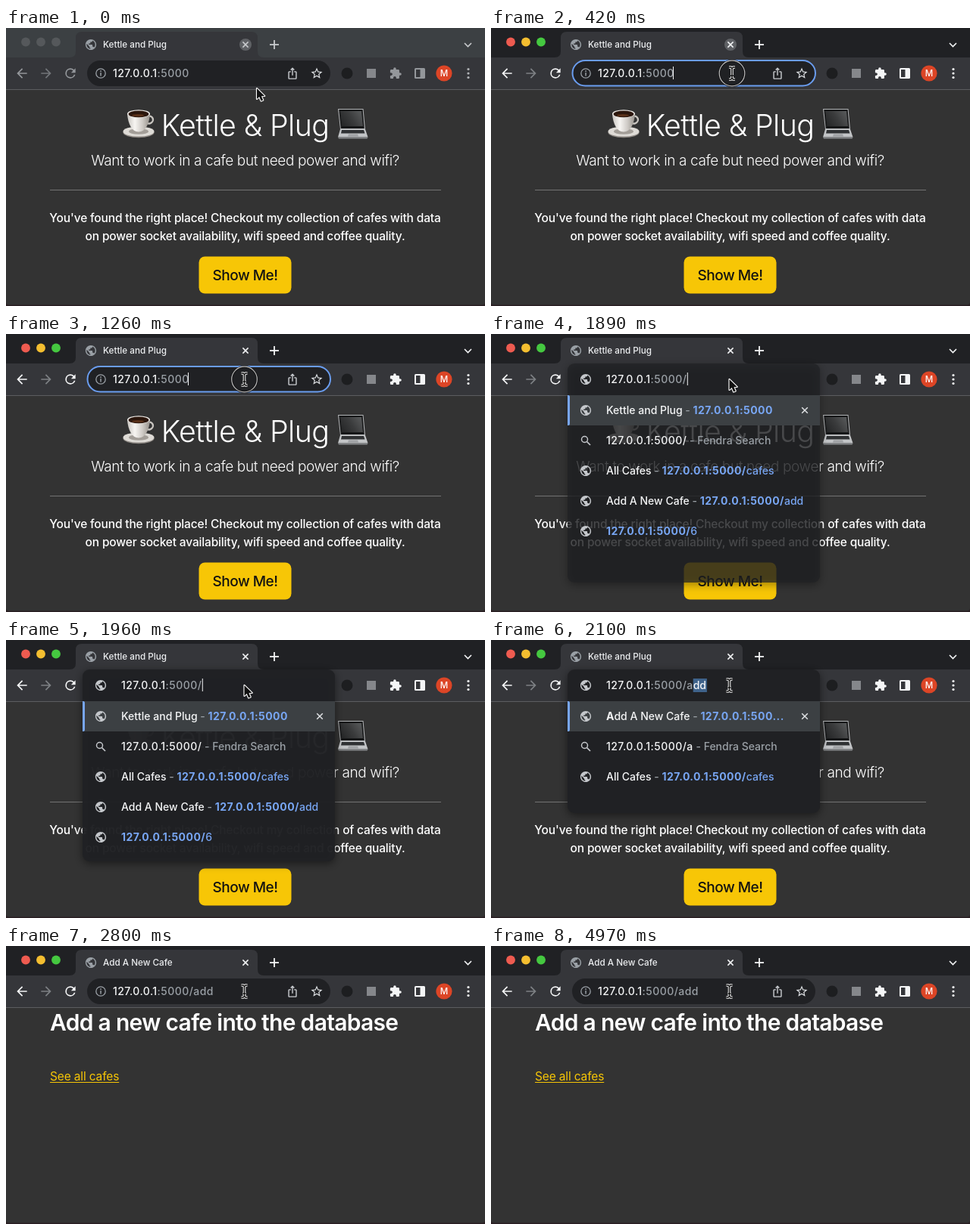
Animation of 632x368 px, one loop 5390 ms. Source, as an HTML page with a canvas:

```html
<!DOCTYPE html>
<html lang="en">
<head>
<meta charset="utf-8">
<title>Kettle and Plug</title>
<style>
  html, body { margin: 0; width: 100%; height: 100%; overflow: hidden; background: #333; }
  canvas { display: block; width: 632px; height: 368px; }
</style>
</head>
<body>
<canvas id="stage" width="632" height="368"></canvas>
<script>
const g = document.getElementById('stage').getContext('2d');
const LOOP = 5390, TICK = 70;
const WHITE = '#f4f5f6', GREY = '#9aa0a6', BLUE = '#78a6f3', YELLOW = '#f7c606';
const SELECT = '#3f638b', DARK = '#202124', BAR = '#35363a', PAGE = '#333333';
const HOST = '127.0.0.1', ADDR = HOST + ':5000';

const icons = {
  globe: 'M12 2C6.48 2 2 6.48 2 12s4.48 10 10 10 10-4.48 10-10S17.52 2 12 2zm-1 17.93c-3.95-.49-7-3.85-7-7.93 0-.62.08-1.21.21-1.79L9 15v1c0 1.1.9 2 2 2v1.93zm6.9-2.54c-.26-.81-1-1.39-1.9-1.39h-1v-3c0-.55-.45-1-1-1H8v-2h2c.55 0 1-.45 1-1V7h2c1.1 0 2-.9 2-2v-.41c2.93 1.19 5 4.06 5 7.41 0 2.08-.8 3.97-2.1 5.39z',
  reload: 'M17.65 6.35A7.96 7.96 0 0 0 12 4a8 8 0 1 0 7.73 10h-2.08A6 6 0 1 1 12 6c1.66 0 3.14.69 4.22 1.78L13 11h7V4l-2.35 2.35z',
  back: 'M20 11H7.83l5.59-5.59L12 4l-8 8 8 8 1.41-1.41L7.83 13H20v-2z',
  star: 'M22 9.24l-7.19-.62L12 2 9.19 8.63 2 9.24l5.46 4.73L5.82 21 12 17.27 18.18 21l-1.63-7.03L22 9.24zM12 15.4l-3.76 2.27 1-4.28-3.32-2.88 4.38-.38L12 6.1l1.71 4.04 4.38.38-3.32 2.88 1 4.28L12 15.4z',
  share: 'M16 5l-1.42 1.42-1.59-1.59V16h-1.98V4.83L9.42 6.42 8 5l4-4 4 4zm4 5v11c0 1.1-.9 2-2 2H6c-1.11 0-2-.9-2-2V10c0-1.11.89-2 2-2h3v2H6v11h12V10h-3V8h3c1.1 0 2 .89 2 2z',
  puzzle: 'M20.5 11H19V7c0-1.1-.9-2-2-2h-4V3.5a2.5 2.5 0 0 0-5 0V5H4c-1.1 0-2 .9-2 2v3.8h1.5c1.49 0 2.7 1.21 2.7 2.7s-1.21 2.7-2.7 2.7H2V20c0 1.1.9 2 2 2h3.8v-1.5c0-1.49 1.21-2.7 2.7-2.7s2.7 1.21 2.7 2.7V22H17c1.1 0 2-.9 2-2v-4h1.5a2.5 2.5 0 0 0 0-5z'
};
for (const k in icons) icons[k] = new Path2D(icons[k]);

function icon(name, x, y, size, color, flip) {
  const s = size / 24;
  g.save();
  g.translate(x, y);
  g.scale(flip ? -s : s, s);
  g.translate(-12, -12);
  g.fillStyle = color;
  g.fill(icons[name]);
  g.restore();
}

function box(x, y, w, h, r, fill) {
  g.beginPath();
  g.roundRect(x, y, w, h, r);
  g.fillStyle = fill;
  g.fill();
}

function oval(x, y, rx, ry, fill) {
  g.beginPath();
  g.ellipse(x, y, rx, ry, 0, 0, Math.PI * 2);
  g.fillStyle = fill;
  g.fill();
}

const dot = (x, y, r, fill) => oval(x, y, r, r, fill);

function ring(x, y, r, width, color) {
  g.beginPath();
  g.arc(x, y, r, 0, Math.PI * 2);
  stroke(width, color);
}

function stroke(width, color) {
  g.lineWidth = width;
  g.strokeStyle = color;
  g.stroke();
}

function poly(pts) {
  g.beginPath();
  for (let i = 0; i < pts.length; i += 2) g.lineTo(pts[i], pts[i + 1]);
}

function line(width, color, ...pts) {
  poly(pts);
  stroke(width, color);
}

function fillPoly(fill, ...pts) {
  poly(pts);
  g.fillStyle = fill;
  g.fill();
}

function fade(x0, y0, x1, y1, ...colors) {
  const f = g.createLinearGradient(x0, y0, x1, y1);
  colors.forEach((c, i) => f.addColorStop(i / (colors.length - 1), c));
  return f;
}

function cross(x, y, r, color) {
  line(1.5, color, x - r, y - r, x + r, y + r);
  line(1.5, color, x + r, y - r, x - r, y + r);
}

// Returns the advance width of the drawn text.
function text(s, x, y, size, color, { weight = 400, align = 'left', track = 0 } = {}) {
  g.font = `${weight} ${size}px Inter, "Open Sans", sans-serif`;
  g.letterSpacing = track + 'px';
  g.textAlign = align;
  g.fillStyle = color;
  g.fillText(s, x, y);
  return g.measureText(s).width;
}

// Addresses are set a little wider than words.
function runs(x, y, parts) {
  for (const [s, color, weight = 450] of parts) {
    x += text(s, x, y, 14, color, { weight, track: /\d/.test(s) ? 0.45 : 0 });
  }
  return x;
}

function frame(active, title, hover) {
  box(0, 0, 632, 82, 0, active ? DARK : '#3c4043');
  const lights = active ? ['#ee5b50', '#f4be30', '#45c840'] : Array(3).fill('#55585b');
  lights.forEach((c, i) => dot(26 + i * 20, 18.5, 5.9, c));

  g.beginPath();
  g.moveTo(84, 39);
  g.quadraticCurveTo(92, 39, 92, 31);
  g.lineTo(92, 13);
  g.quadraticCurveTo(92, 5, 100, 5);
  g.lineTo(324, 5);
  g.quadraticCurveTo(332, 5, 332, 13);
  g.lineTo(332, 31);
  g.quadraticCurveTo(332, 39, 340, 39);
  g.fillStyle = BAR;
  g.fill();
  box(0, 39, 632, 42, 0, BAR);
  box(0, 81, 632, 1, 0, '#5c5d60');

  const bright = active ? WHITE : '#c8cacd';
  icon('globe', 112, 22, 17, GREY);
  text(title, 128, 26, 11.7, '#eceef0', { weight: 500 });
  if (hover) dot(316, 22, 8, '#5f6165');
  cross(316, 22, 3.6, bright);
  line(1.8, bright, 348, 22, 360, 22);
  line(1.8, bright, 354, 16, 354, 28);
  line(1.6, bright, 605, 20, 609.5, 24.5, 614, 20);

  const tool = active ? WHITE : '#94979b';
  icon('back', 21, 60, 20, tool);
  icon('back', 53, 60, 20, active ? '#7d8084' : '#73767a', true);
  icon('reload', 85, 60, 20, tool);
  dot(450, 60, 7.5, '#1d1e20');
  box(476, 54, 12, 12, 0, '#85878b');
  icon('puzzle', 514, 60, 17, tool);
  box(539, 53, 14, 14, 1.5, tool);
  box(541, 55, 5.5, 10, 0, BAR);
  dot(578, 60, 10.6, '#dc4526');
  text('M', 578, 64, 11.5, '#fff', { weight: 500, align: 'center' });
  for (const y of [54.5, 60, 65.5]) dot(610, y, 1.6, active ? WHITE : '#b0b3b6');
}

function omnibox(path, focus, selected, caret) {
  box(107, 43, 321, 34, 17, DARK);
  if (focus) {
    g.beginPath();
    g.roundRect(107.5, 43, 320.5, 33.5, 16.75);
    stroke(2, '#6a9df0');
  }
  ring(125, 60, 6.2, 1.3, GREY);
  box(124.3, 59, 1.5, 4.5, 0, GREY);
  box(124.3, 56.3, 1.5, 1.6, 0, GREY);
  if (selected) box(141, 51, 100, 18, 0, SELECT);
  runs(141, 65, [[HOST, WHITE], [':5000' + path, selected ? WHITE : GREY]]);
  if (caret) box(240, 51, 1, 17, 0, WHITE);
  icon('share', 378, 60, 17, '#c9ccd0');
  icon('star', 410, 60, 18, '#dcdfe2');
}

function cup() {
  oval(175, 138.2, 20.5, 7, '#8f8a85');
  oval(175, 137, 20.5, 6.6, '#dedbd6');
  oval(175, 137, 13, 3.8, '#a39e98');
  g.beginPath();
  g.ellipse(188.5, 121.5, 5.5, 5, -0.3, 0, Math.PI * 2);
  stroke(2.4, '#c9c5c0');
  g.beginPath();
  g.moveTo(160, 113.5);
  g.bezierCurveTo(161, 127, 166, 137.5, 175, 137.5);
  g.bezierCurveTo(184, 137.5, 189, 127, 190, 113.5);
  g.fillStyle = fade(160, 0, 190, 0, '#c9c6c1', '#f7f5f2', '#cfcbc6', '#96918b');
  g.fill();
  oval(175, 113.5, 15, 5.3, '#ece9e5');
  oval(175, 113.9, 13.4, 4.3, '#2b160c');
  oval(174, 115.6, 8, 1.7, '#5a3119');
}

function laptop() {
  fillPoly('#b4b6b8', 438, 107, 471.5, 107, 474, 134, 441, 134);
  fillPoly('#151617', 439.2, 108, 470.6, 108, 472.8, 133, 441.8, 133);
  fillPoly(fade(441, 130, 471, 110, '#222324', '#3a3b3c', '#5c5e5f'),
    441, 110, 469, 110, 471, 130, 443, 130);
  fillPoly('#c2c4c6', 441, 134, 474, 134, 477.5, 144.5, 438, 144.5);
  fillPoly('#85888a', 438, 144.5, 477.5, 144.5, 476.5, 146.5, 439, 146.5);
  fillPoly('#303234', 443, 135, 472, 135, 473.5, 139.5, 442, 139.5);
  fillPoly('#9fa1a4', 452, 140.5, 464, 140.5, 465, 143.5, 451, 143.5);
}

function home() {
  const mid = { align: 'center' };
  cup();
  laptop();
  text('Kettle & Plug', 315.5, 143, 39.3, '#fff', { ...mid, weight: 350, track: -0.6 });
  text('Want to work in a cafe but need power and wifi?', 315.5, 182, 19, '#fff',
    { ...mid, weight: 350, track: -0.38 });
  box(58, 214, 516, 1, 0, '#737373');
  const body = { ...mid, weight: 450, track: -0.16 };
  text("You've found the right place! Checkout my collection of cafes with data", 315.5, 257, 15.5, '#fff', body);
  text('on power socket availability, wifi speed and coffee quality.', 315.5, 281, 15.5, '#fff', body);
  box(254.5, 302.5, 122, 49, 8, YELLOW);
  text('Show Me!', 315.5, 334, 19, '#111', { ...mid, weight: 450, track: -0.5 });
}

function addPage() {
  text('Add a new cafe into the database', 58, 112, 30, '#fff', { weight: 600, track: -0.7 });
  const w = text('See all cafes', 58, 178, 15.5, YELLOW, { track: -0.15 });
  box(58, 180, w, 1.1, 0, YELLOW);
}

const dash = [' - ', GREY];
const bold = s => [s, BLUE, 700];
const search = path => ({ find: true, parts: [[ADDR + path, WHITE], [' - Fendra Search', GREY]] });
const link = (title, tail) => ({ parts: [[title, WHITE], dash, bold(ADDR + '/'), [tail, BLUE]] });
const addRow = n => ({
  parts: [['Add'.slice(0, n), WHITE, 700], ['Add'.slice(n) + ' A New Cafe', WHITE], dash, bold(HOST + ':500...')]
});

function rowsFor(path) {
  if (path === '/') return [
    { parts: [['Kettle and Plug', WHITE], dash, bold(ADDR)] },
    search('/'),
    link('All Cafes', 'cafes'),
    link('Add A New Cafe', 'add'),
    { parts: [bold(ADDR + '/'), ['6', BLUE]] }
  ];
  const rows = [addRow(path.length - 1), search(path)];
  if (path === '/a') rows.push(link('All Cafes', 'cafes'));
  return rows;
}

function popup(path, bottom, alpha) {
  g.save();
  g.globalAlpha = alpha;
  g.shadowColor = 'rgba(0,0,0,.5)';
  g.shadowBlur = 12;
  g.shadowOffsetY = 3;
  box(101, 39, 333, bottom - 39, 9, DARK);
  g.restore();

  icon('globe', 125, 60, 17, '#c4c7cb');
  const x = runs(152, 65, [[HOST, WHITE], [':5000' + path, GREY]]);
  const rest = path === '/' ? '' : '/add'.slice(path.length);
  if (rest) {
    box(x, 51, g.measureText(rest).width, 18, 0, SELECT);
    runs(x, 65, [[rest, WHITE]]);
  } else {
    box(x + 0.5, 51, 1, 17, 0, WHITE);
  }

  box(101, 81, 333, 40, 0, '#3c4043');
  box(101, 81, 3, 40, [0, 2, 2, 0], BLUE);
  cross(414, 101, 3.8, '#dfe1e4');
  rowsFor(path).forEach((row, i) => {
    const y = 101 + i * 40;
    if (row.find) {
      ring(123.5, y - 1.5, 4, 1.5, '#c4c7cb');
      line(1.7, '#c4c7cb', 126.5, y + 1.5, 131, y + 6);
    } else {
      icon('globe', 125, y, 17, '#c4c7cb');
    }
    runs(152, y + 5, row.parts);
  });
}

function arrow(x, y) {
  g.save();
  g.translate(x, y);
  g.lineJoin = 'round';
  poly([0, 0, 0, 14, 3.2, 11, 5.6, 16.6, 8.2, 15.4, 5.9, 10.2, 10.2, 10]);
  g.closePath();
  stroke(2.2, '#fff');
  g.fillStyle = '#111';
  g.fill();
  g.restore();
}

function ibeam(x, y) {
  for (const [w, c] of [[3.6, '#f0f0f0'], [1.5, '#111']]) {
    line(w, c, x - 4, y - 8, x - 1.5, y - 8, x, y - 6.5, x, y + 6.5, x - 1.5, y + 8, x - 4, y + 8);
    line(w, c, x + 4, y - 8, x + 1.5, y - 8, x, y - 6.5);
    line(w, c, x + 4, y + 8, x + 1.5, y + 8, x, y + 6.5);
    line(w, c, x - 2, y + 3, x + 2, y + 3);
  }
}

const clamp = v => Math.max(0, Math.min(1, v));
const ease = v => v * v * (3 - 2 * v);
const mix = (a, b, v) => a + (b - a) * v;

function pointer(t) {
  const enter = ease(clamp(t / 350)), nudge = ease(clamp((t - 700) / 210));
  const x = mix(mix(331, 318, enter), 314.5, nudge), y = mix(80, 60, enter);
  const pressed = (t >= 420 && t < 560) || (t >= 1260 && t < 1330);
  if (pressed) {
    ring(x, y, 16.6, 3, '#151517');
    ring(x, y, 16.8, 1.2, '#bdbdbd');
  }
  const overPopup = t >= 1890 && t < 2100;
  if (y > 77 || overPopup) arrow(x, y);
  else ibeam(x, y);
}

function draw(t) {
  const active = t >= 420, loaded = t >= 2800;
  const open = t >= 1890 && t < 2730;
  box(0, 0, 632, 368, 0, '#2a1f23');
  box(0, 0, 632, 366.5, [0, 0, 4, 4], PAGE);
  if (loaded) addPage();
  else home();
  frame(active, loaded ? 'Add A New Cafe' : 'Kettle and Plug', t < 560);

  if (open) {
    const path = t < 2030 ? '/' : t < 2240 ? '/a' : t < 2450 ? '/ad' : '/add';
    const bottom = t < 1960 ? 329 : t < 2030 ? 293 : t < 2240 ? mix(249, 209, clamp((t - 2030) / 140)) : 171;
    popup(path, bottom, t < 1960 ? 0.7 : t < 2030 ? 0.95 : 1);
  } else {
    const focus = active && t < 1890;
    const selected = t >= 560 && t < 1260;
    omnibox(t >= 2730 ? '/add' : '', focus, selected, focus && !selected && t < 1750);
  }
  pointer(t);
}

const start = performance.now();
function tick() {
  const t = (performance.now() - start) % LOOP;
  draw(Math.floor(t / TICK) * TICK);
  requestAnimationFrame(tick);
}
tick();
</script>
</body>
</html>
```
